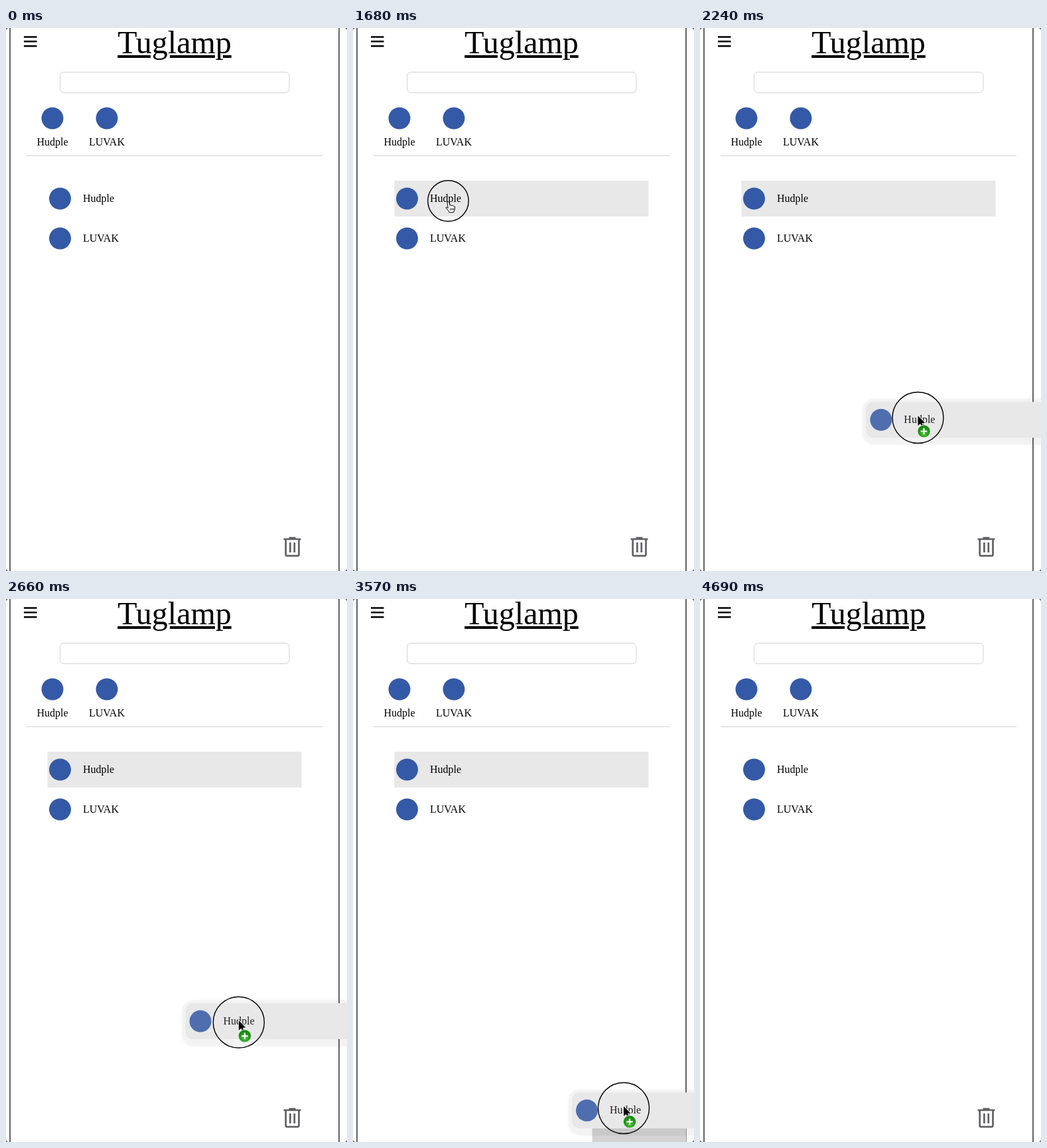
These frames come from a looping animation (514 px wide and 818 px high, 5740 ms). An HTML page:

```html
<!DOCTYPE html>
<html lang="en">
<head>
<meta charset="utf-8">
<title>Bookmark drag</title>
<style>
  html, body { margin: 0; width: 100%; height: 100%; overflow: hidden; background: #fff; }
  svg { position: absolute; left: 0; top: 0; }
  svg, h1 { font-family: "Liberation Serif", Times, serif; font-size: 16px; }
  h1 {
    position: absolute; left: 0; top: -6px; width: 508px; margin: 0;
    font-size: 48px; font-weight: 400; line-height: 56px; text-align: center;
    text-decoration: underline 4px; text-underline-offset: 3px;
  }
</style>
</head>
<body>
<h1>Tuglamp</h1>
<svg width="514" height="818" viewBox="0 0 514 818">
  <defs>
    <radialGradient id="green" cy=".7">
      <stop stop-color="#4cc43a"/><stop offset="1" stop-color="#178a12"/>
    </radialGradient>
    <filter id="soft"><feGaussianBlur stdDeviation=".8"/></filter>
    <circle id="icon" r="16.5" fill="#3459a6"/>
    <g id="item">
      <use href="#icon" x="81.5" y="257"/>
      <text x="116" y="262">Hudple</text>
    </g>
  </defs>

  <path d="M0 0h3L0 3zM514 0h-3l3 3zM0 818h3l-3-3zM514 818h-3l3-3z" fill="#777"/>
  <path d="M6 0V818M502 0V818" stroke="#3c3c3c" stroke-width="1.6"/>
  <path d="M27 13.5h19.5M27 20.3h19.5M27 27.2h19.5" stroke="#000" stroke-width="2.6"/>
  <rect x="81.5" y="66.5" width="345.5" height="31" rx="6" fill="none" stroke="#d2d2d2"/>
  <path d="M31 192.5H477" stroke="#d2d2d2"/>

  <use href="#icon" x="70" y="136"/>
  <use href="#icon" x="152" y="136"/>
  <g text-anchor="middle">
    <text x="70" y="177">Hudple</text>
    <text x="152" y="177">LUVAK</text>
  </g>

  <rect id="hover" x="62.5" y="230" width="383" height="54" fill="#e8e8e8"/>
  <use href="#item"/>
  <use href="#icon" x="81.5" y="317"/>
  <text x="116" y="322">LUVAK</text>

  <rect id="dropZone" x="360.5" y="746" width="142" height="72" fill="#d3d3d3"/>
  <g fill="none" stroke="#616165" stroke-width="2.7">
    <path d="M418.5 770H444.5M426.5 768.2H436.5"/>
    <path d="M421.7 770V793q0 2.2 2.2 2.2H439.3q2.2 0 2.2-2.2V770"/>
    <path d="M428.4 775V790M434.8 775V790"/>
  </g>

  <g id="drag">
    <rect x="53" y="225" width="402" height="70" rx="18" fill="#000" opacity=".045" filter="url(#soft)"/>
    <rect x="59" y="230" width="389" height="54" rx="11" fill="#e8e8e8"/>
    <use href="#item" opacity=".85"/>
  </g>

  <g id="cursor">
    <circle id="ring" fill="none" stroke="#000" stroke-width="1.4"/>
    <path id="arrow" d="M0-3V12.2L3.6 8.9 6 14.2 8.3 13.2 6 8H10.6z"
      stroke="#fff" stroke-width="1.6" paint-order="stroke"/>
    <path id="hand" d="M-1.5 1.5q1.8-1.5 2.8.8L2.7 7q2-1 2.7.3 2-1 2.7.5 2-.4 2 1.7 0 4.5-2 7.8H1.6Q.5 14-3.3 10.8q-.5-2.5 3 .1zM3.5 11v3M5.7 11v3M7.8 11v3"
      fill="#fff" stroke="#000" stroke-width="1" stroke-linejoin="round"/>
    <g id="badge" transform="translate(9 20.5)">
      <circle r="9.6" fill="url(#green)" stroke="#dcead9" stroke-width="1"/>
      <path d="M-4.8 0H4.8M0-4.8V4.8" stroke="#fff" stroke-width="2.2"/>
    </g>
  </g>
</svg>

<script>
const LOOP = 5740, STEP = 70;
const START = [143.5, 260.5], GRAB_OFFSET = [6.5, 7], LAG = 13;

// Pointer stops: time, x, y, optional time warp for the move into that stop
const stops = [
  [140, 262, 808], [630, 143.5, 264], [1190, 143.5, 264], [1260, ...START],
  [1750, ...START], [2240, 328.5, 587, .625], [2450, 328.5, 587],
  [3010, 399, 747.5], [3080, 407, 754.5], [3570, 408, 767],
  [3850, 408, 767], [4130, 411, 782], [4340, 411, 782], [4690, 416, 840]
];

const el = id => document.getElementById(id);
const show = (id, on) => { el(id).style.display = on ? "" : "none"; };
const move = (id, x, y) => el(id).setAttribute("transform", `translate(${x} ${y})`);

function pointerAt(t) {
  const i = stops.findIndex(s => s[0] > t);
  if (i < 0) return stops.at(-1).slice(1, 3);
  if (i === 0) return stops[0].slice(1, 3);
  const [t0, x0, y0] = stops[i - 1], [t1, x1, y1, warp = 1] = stops[i];
  const u = ((t - t0) / (t1 - t0)) ** warp;
  const k = u * u * (3 - 2 * u);
  return [x0 + (x1 - x0) * k, y0 + (y1 - y0) * k];
}

function hoverAt(t) {
  if (t < 1050 || t >= 3920) return 0;
  return t < 1120 || t >= 3780 ? .5 : 1;
}

function draw(t) {
  const within = (from, to) => t >= from && t < to;
  const dragging = within(1820, 3780), pointing = within(1260, 1820);
  const [gx, gy] = pointerAt(t - LAG);

  show("cursor", within(70, 4690));
  show("ring", within(1680, 3780));
  show("hand", pointing);
  show("arrow", !pointing);
  show("badge", dragging);
  show("drag", dragging);
  show("dropZone", within(3080, 3780));
  el("hover").setAttribute("opacity", hoverAt(t));
  el("ring").setAttribute("r", t < 1750 ? 30.7 : 38.5);
  move("cursor", ...pointerAt(t));
  move("drag", gx - START[0] + GRAB_OFFSET[0], gy - START[1] + GRAB_OFFSET[1]);
}

function frame() {
  draw(Math.floor(performance.now() % LOOP / STEP) * STEP);
  requestAnimationFrame(frame);
}
frame();
</script>
</body>
</html>
```
